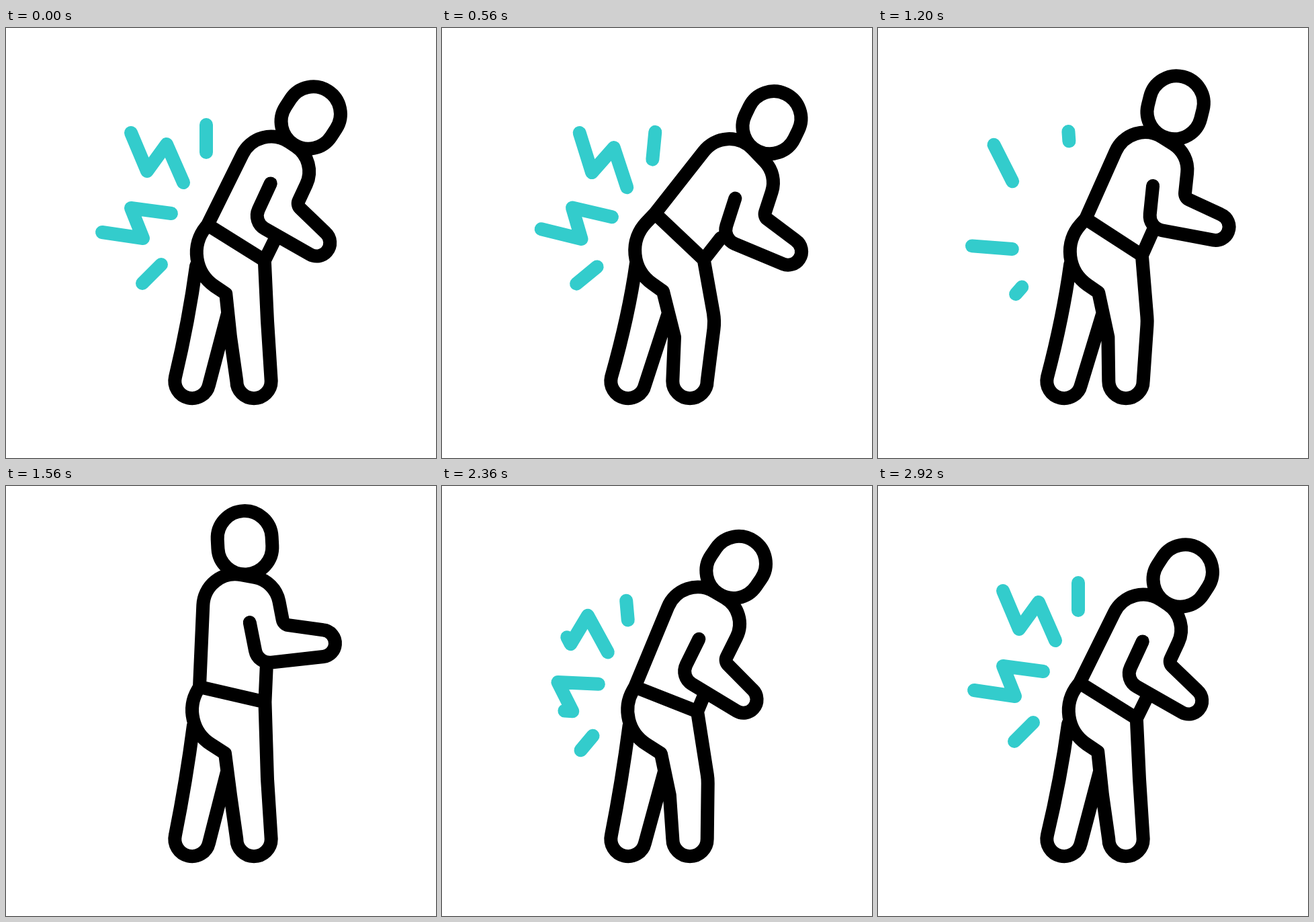
An HTML page with a canvas that plays this animation: 640x640 px, repeating every 3000 ms.

```html
<!DOCTYPE html>
<html lang="en">
<head>
<meta charset="utf-8">
<title>Back pain</title>
<style>
  html, body { margin: 0; width: 100%; height: 100%; overflow: hidden; background: #fff; }
  canvas { display: block; width: 640px; height: 640px; }
</style>
</head>
<body>
<canvas id="stage" width="640" height="640"></canvas>
<script>
const ctx = document.getElementById('stage').getContext('2d');
const LOOP = 3000, STEP = 40, FOOT_Y = 525.5, FOOT_R = 25.7;

// A pose: back of the waist (x, y), trunk length, lean and belt angles, elbow (ex, ey),
// swing of the upper arm, bend of the knee, then drop and turn of the pain marks.
const pose = (x, y, trunk, lean, belt, ex, ey, arm, knee, drop, turn) =>
  ({ x, y, trunk, lean, belt, ex, ey, arm, knee, drop, turn });

const hurting = pose(300, 293, 172, 26.3, 32, 400, 276, -25, 0, 0, 0);
const stooped = pose(317, 276, 173, 38.2, 43.4, 448, 297, -18, 1, .5, 5.5);
const rising = pose(309, 284, 165, 24, 33, 429.5, 275, -6, .7, 16.3, -4);
const upright = pose(288, 299, 177, 2.5, 13, 394, 235.5, 11, 0, 58, -22);
const bending = pose(288, 299, 180, 17.8, 19, 389, 261, -22, .4, 25, -7.5);
const settling = pose(287, 299, 184, 22.5, 21.5, 387.5, 272.5, -26.5, .4, 22.5, -5);

const mapPose = (p, fn) => Object.fromEntries(Object.keys(p).map(k => [k, fn(k)]));
const mix = (a, b, s) => mapPose(a, k => a[k] + (b[k] - a[k]) * s);

const keys = [
  [80, hurting], [560, stooped], [720, mix(hurting, stooped, 1.12)], [1200, rising],
  [1560, upright], [1700, mix(rising, upright, 1.04)], [2040, bending],
  [2360, settling], [2920, hurting]
];

const slope = (i, k) => (keys[i + 1][1][k] - keys[i][1][k]) / (keys[i + 1][0] - keys[i][0]);

// Monotone cubic tangent, flat at turning points.
function tangent(i, k) {
  if (i === 0 || i === keys.length - 1) return 0;
  const a = slope(i - 1, k), b = slope(i, k);
  return a * b <= 0 ? 0 : 2 * a * b / (a + b);
}

function poseAt(time) {
  const t = Math.min(Math.max(time, keys[0][0]), keys[keys.length - 1][0]);
  let i = 0;
  while (i < keys.length - 2 && t >= keys[i + 1][0]) i++;
  const [t0, a] = keys[i], [t1, b] = keys[i + 1];
  const h = t1 - t0, s = (t - t0) / h, r = 1 - s;
  return mapPose(a, k =>
    a[k] * (1 + 2 * s) * r * r + b[k] * s * s * (3 - 2 * s) +
    h * s * r * (r * tangent(i, k) - s * tangent(i + 1, k)));
}

const rad = degrees => degrees * Math.PI / 180;

// Point at a distance from p; angles are in degrees, clockwise from the right.
const polar = ([x, y], angle, d) => [x + d * Math.cos(rad(angle)), y + d * Math.sin(rad(angle))];

// Where the line through p at angle a meets the line through q at angle b.
function cross(p, a, q, b) {
  const d = ((q[0] - p[0]) * Math.sin(rad(b)) - (q[1] - p[1]) * Math.cos(rad(b))) / Math.sin(rad(b - a));
  return polar(p, a, d);
}

const move = p => ctx.moveTo(...p);
const line = p => ctx.lineTo(...p);
const bend = (corner, next, radius) => ctx.arcTo(...corner, ...next, radius);

function drawTorso(p, waist, front) {
  const { lean, arm } = p;
  const shoulderR = 48, handR = 20, taper = 84;
  const shoulder = polar(waist, lean - 90, p.trunk);
  const elbow = [p.ex, p.ey];
  const across = -(arm + 46);
  const inner = polar(elbow, across, 35), outer = polar(elbow, across + 180, 35);
  const armTop = polar(elbow, -123 - arm, 45);
  const chest = cross(shoulder, lean + 8, inner, 90 - arm);
  const reach = 10 - arm;
  const hand = polar(elbow, reach, 76);
  const palmTop = polar(hand, reach - taper, handR), palmLow = polar(hand, reach + taper, handR);

  move(waist);
  bend(shoulder, chest, shoulderR);
  bend(chest, inner, 45);
  bend(inner, palmTop, 10);
  ctx.arc(...hand, handR, rad(reach - taper), rad(reach + taper));
  bend(outer, armTop, 22);
  line(armTop);

  const lowerArm = Math.atan2(palmLow[1] - outer[1], palmLow[0] - outer[0]) * 180 / Math.PI;
  move(cross(front, lean - 90, outer, lowerArm));
  line(front);
  line(waist);
}

function drawLegs(p, waist, front) {
  const h = (p.x - 288) / 29;
  const crotch = [326 + 3 * h, 398 - 6 * h];
  const knee = [334 + 12 * p.knee, 460];
  const heel = [369 + FOOT_R, FOOT_Y];

  move(waist);
  bend([256, 353 - 13 * h], crotch, 60);
  line(crotch);
  line(knee);
  ctx.arc(369, FOOT_Y, FOOT_R, Math.PI, 0, true);
  bend([389 + 17 * p.knee, 436], front, 80);
  line(front);

  const tilt = .23;
  move([279 + 10 * h, 356 - 6 * h]);
  ctx.quadraticCurveTo(268 + 10 * h, 440 - 12 * h,
    277 - FOOT_R * Math.cos(tilt), FOOT_Y - FOOT_R * Math.sin(tilt));
  ctx.arc(277, FOOT_Y, FOOT_R, Math.PI + tilt, tilt, true);
  const s = (424 - crotch[1]) / (knee[1] - crotch[1]);
  line([crotch[0] + (knee[0] - crotch[0]) * s, 424]);
}

function drawHead(p, waist) {
  const tilt = 8 - p.arm, neck = .55 * p.lean + .45 * tilt + 8.5;
  const back = polar(waist, p.lean - 90, p.trunk - 55);
  const center = polar(polar(back, p.lean, 48), neck - 90, 96);
  ctx.save();
  ctx.translate(...center);
  ctx.rotate(rad(tilt));
  ctx.beginPath();
  ctx.arc(0, -6.7, 40.5, Math.PI, 0);
  ctx.arc(0, 6.7, 40.5, 0, Math.PI);
  ctx.closePath();
  ctx.stroke();
  ctx.restore();
}

function drawBody(p) {
  const waist = [p.x, p.y], front = polar(waist, p.belt, 100);
  ctx.strokeStyle = '#000';
  ctx.beginPath();
  drawTorso(p, waist, front);
  drawLegs(p, waist, front);
  ctx.stroke();
  drawHead(p, waist);
}

// Pain marks, each from its outer to its inner end.
const marks = [
  [[186, 156], [210, 213], [239, 173], [264, 230]],
  [[143, 304], [204, 313], [186, 268], [246, 276]],
  [[298, 144], [298, 185]],
  [[203, 380], [231, 352]]
];

function smooth(t, from, to) {
  const s = Math.min(Math.max((t - from) / (to - from), 0), 1);
  return s * s * (3 - 2 * s);
}

function drawMarks(p, t) {
  const growing = t >= 2000;
  const part = growing ? smooth(t, 2000, 2560) : 1 - smooth(t, 864, 1424);
  if (part <= 0) return;
  ctx.save();
  ctx.translate(200 + Math.min(0, (p.x - 300) / 2), 350 + p.drop);
  ctx.rotate(rad(p.turn));
  ctx.translate(-200, -350);
  ctx.strokeStyle = '#33cccc';
  for (const mark of marks) {
    const total = mark.slice(1).reduce((sum, [x, y], i) =>
      sum + Math.hypot(x - mark[i][0], y - mark[i][1]), 0);
    const shown = total * part;
    ctx.setLineDash(part < 1 ? [shown + (growing ? 1 : 0), total * 2] : []);
    ctx.lineDashOffset = growing ? shown - total : 0;
    ctx.beginPath();
    move(mark[0]);
    mark.slice(1).forEach(line);
    ctx.stroke();
  }
  ctx.restore();
}

function frame() {
  const t = Math.floor(performance.now() % LOOP / STEP) * STEP;
  const p = poseAt(t);
  ctx.fillStyle = '#fff';
  ctx.fillRect(0, 0, 640, 640);
  ctx.lineWidth = 20;
  ctx.lineCap = ctx.lineJoin = 'round';
  drawMarks(p, t);
  drawBody(p);
  requestAnimationFrame(frame);
}
frame();
</script>
</body>
</html>
```
